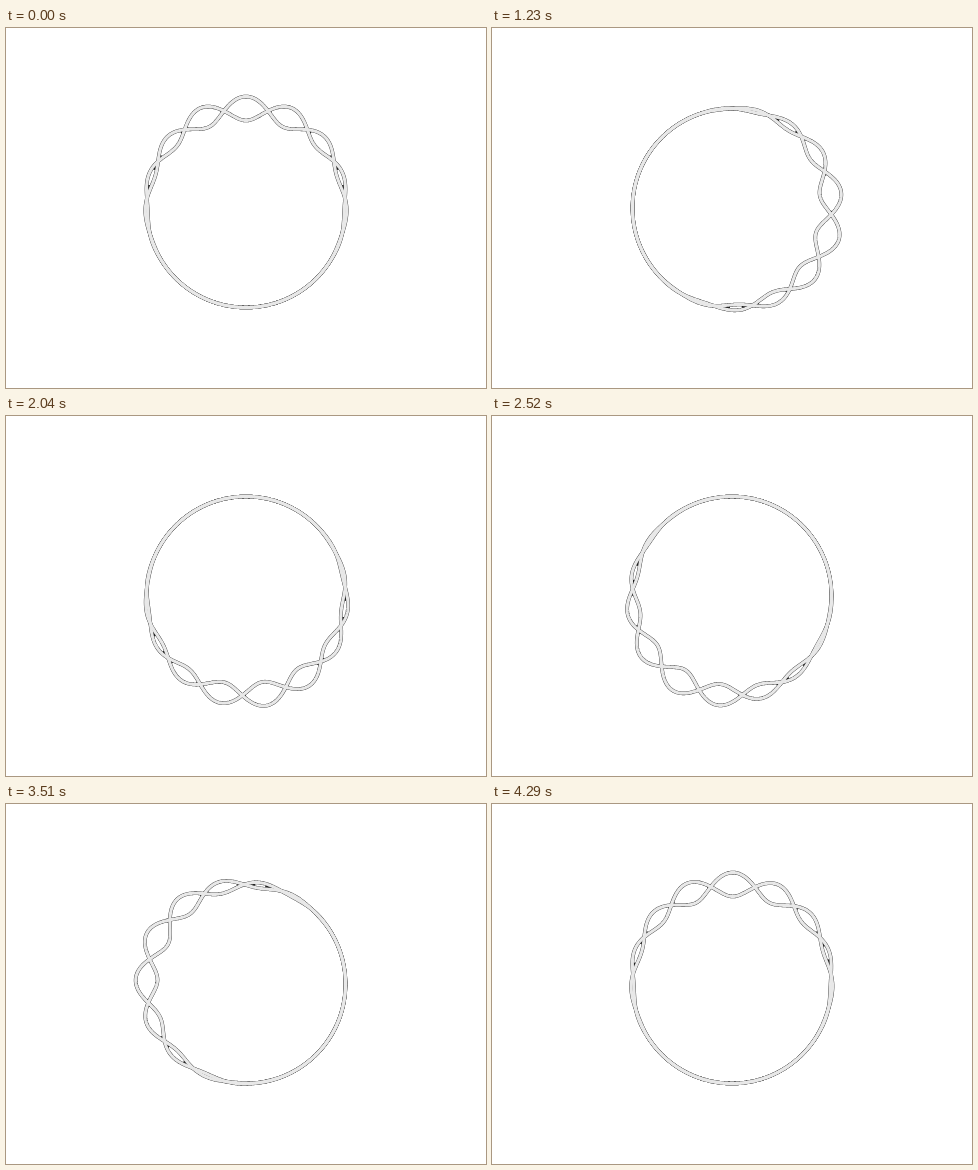
Animation of 480 by 360 pixels, one loop 4.32 s. Source, as an HTML page with a canvas:

```html
<!DOCTYPE html>
<html>
<head>
<meta charset="utf-8">
<style>
  html, body { margin: 0; width: 100%; height: 100%; overflow: hidden; background: #fff; }
  canvas { display: block; }
</style>
</head>
<body>
<canvas id="stage" width="480" height="360"></canvas>
<script>
const ctx = document.getElementById('stage').getContext('2d');
const TAU = 2 * Math.PI;
const LOOP = 4320, STEP = 30;
const RADIUS = 99.5, AMP = 12, STEPS = 720;
const NARROW_GAP = 5;

// Radial offset of one strand; angles run clockwise from the top.
function offset(angle, turn) {
  const center = turn * TAU;
  const d = Math.atan2(Math.sin(angle - center), Math.cos(angle - center));
  const envelope = ((1 + Math.cos(d)) / 2) ** 3;
  const phase = 7 * (center + d + 0.03 * d ** 3) + 1.5 * center;
  return AMP * envelope * Math.cos(phase);
}

function point(angle, r) {
  return [240 + r * Math.sin(angle), 180 - r * Math.cos(angle)];
}

function strand(offsets, sign) {
  const path = new Path2D();
  offsets.forEach((o, i) => path.lineTo(...point(i / STEPS * TAU, RADIUS + sign * o)));
  path.closePath();
  return path;
}

function stroke(path, color, width) {
  ctx.strokeStyle = color;
  ctx.lineWidth = width;
  ctx.stroke(path);
}

function draw(turn) {
  const offsets = Array.from({ length: STEPS }, (_, i) => offset(i / STEPS * TAU, turn));
  const strands = [strand(offsets, 1), strand(offsets, -1)];

  // Dark slivers where the strands nearly touch
  const slivers = new Path2D();
  offsets.forEach((o, i) => {
    if (2 * Math.abs(o) > NARROW_GAP) return;
    const angle = i / STEPS * TAU;
    slivers.moveTo(...point(angle, RADIUS + o));
    slivers.lineTo(...point(angle, RADIUS - o));
  });

  ctx.fillStyle = '#fff';
  ctx.fillRect(0, 0, 480, 360);
  ctx.lineJoin = 'round';
  stroke(slivers, '#222', 1.2);
  strands.forEach(s => stroke(s, '#222', 3.7));
  strands.forEach(s => stroke(s, '#e8e8e8', 3.1));
}

const start = performance.now();
function frame() {
  const t = (performance.now() - start) % LOOP;
  draw(Math.floor(t / STEP) * STEP / LOOP);
  requestAnimationFrame(frame);
}
frame();
</script>
</body>
</html>
```
